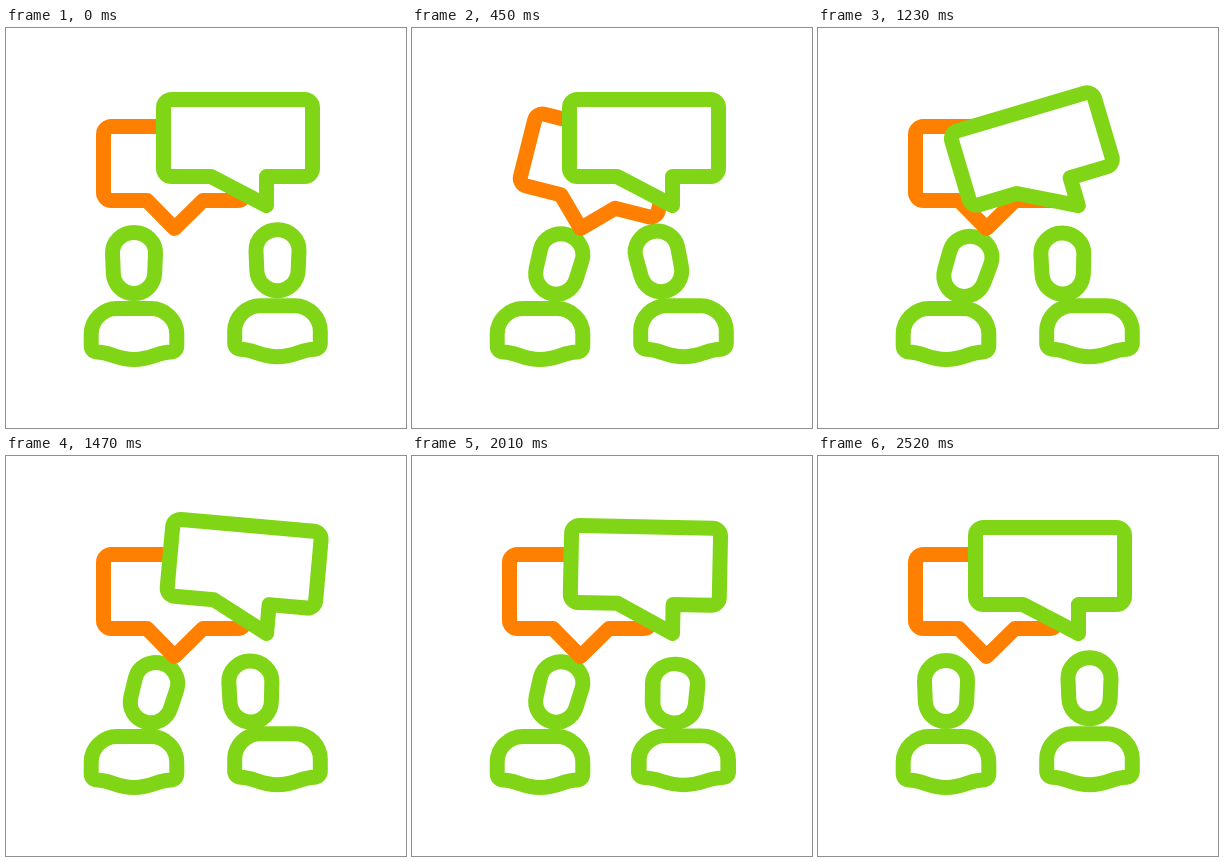
These frames come from a looping animation (400x400 px, 3050 ms). An HTML page:

```html
<!DOCTYPE html>
<html lang="en">
<head>
<meta charset="utf-8">
<title>Conversation</title>
<style>
  html, body { margin: 0; width: 100%; height: 100%; overflow: hidden; background: #fff; }
  svg { display: block; width: 100%; height: 100%; }
  path { fill: #fff; stroke-width: 15; stroke-linejoin: round; }
  .green { stroke: #80d616; }
  .orange { stroke: #ff7f00; }
</style>
</head>
<body>
<svg viewBox="0 0 400 400">
  <defs>
    <path id="head" d="M0-30.5C12-30.5 21.9-21 21.5-9.5L20.7 10C20.2 22 11 30.5 0 30.5S-20.2 22-20.7 10L-21.5-9.5C-21.9-21-12-30.5 0-30.5Z"/>
    <path id="body" d="M-17-58.5H17C31-58.5 42.8-47 42.8-33V-21.5Q42.8-15.5 37-15C24-15 17-7.5 0-7.5S-24-15-37-15Q-42.8-15.5-42.8-21.5V-33C-42.8-47-31-58.5-17-58.5Z"/>
  </defs>
  <g id="left" class="green"><use href="#body"/><use class="head" href="#head"/></g>
  <g id="right" class="green"><use href="#body"/><use class="head" href="#head"/></g>
  <path id="back" class="orange"/>
  <path id="front" class="green"/>
</svg>
<script>
const LOOP = 3050, STEP = 30;
const LEAN_TIME = 400, RETURN_TIME = 305, SQUASH_TIME = 460;
const NOD_START = 780, NOD_TIME = 420, FRONT_DELAY = 1095;
const $ = id => document.getElementById(id);

// Turning points of a bubble's decaying swing: time, angle.
const swing = [[0, 0], [186, -20], [480, 15], [720, -7.8], [1000, 3.6], [1200, 0]];

// lean and nod move the head by x, y and tilt.
const people = [
  { el: $('left'), x: 128, y: 339, lean: [18.8, 1, 15], nod: [2.7, 2.4, 3],
    back: 2040, nodEnd: NOD_START + NOD_TIME },
  { el: $('right'), x: 271.5, y: 336.2, lean: [-24.6, 1.2, -13], nod: [-2.4, 2.2, 12],
    back: 1815, nodEnd: 1815 }
];

const clamp = u => Math.min(1, Math.max(0, u));
const ramp = (t, start, time) => (1 - Math.cos(Math.PI * clamp((t - start) / time))) / 2;
const hump = (t, start, time) => Math.sin(Math.PI * clamp((t - start) / time)) ** 2;

function swingAngle(t) {
  let angle = 0;
  for (let i = 1; i < swing.length; i++) {
    const [from, a] = swing[i - 1], [to, b] = swing[i];
    angle += (b - a) * ramp(t, from, to - from);
  }
  return angle;
}

// Rounded box whose bottom edge, drawn left to right, takes a detour along the tail.
function bubble(left, top, right, bottom, tail) {
  const r = 8, arc = (x, y) => `a${r} ${r} 0 0 0 ${x} ${y}`;
  return `M${left + r} ${bottom}${tail}H${right - r}${arc(r, -r)}V${top + r}${arc(-r, -r)}` +
    `H${left + r}${arc(-r, r)}V${bottom - r}${arc(r, r)}Z`;
}

const place = (el, value) => el.setAttribute('transform', value);

function drawPerson(p, t) {
  const lean = ramp(t, 0, LEAN_TIME) - ramp(t, p.back, RETURN_TIME);
  const nod = ramp(t, NOD_START, NOD_TIME) - ramp(t, p.nodEnd, NOD_TIME);
  const squash = hump(t, 0, LEAN_TIME) + hump(t, p.back - 20, SQUASH_TIME);
  const [x, y, tilt] = p.lean.map((v, i) => v * lean + p.nod[i] * nod);
  place(p.el, `translate(${p.x} ${p.y}) scale(${1 + 0.045 * squash} ${1 - 0.035 * squash})`);
  place(p.el.querySelector('.head'), `translate(${x} ${y - 104}) rotate(${tilt})`);
}

function draw(t) {
  place($('back'), `rotate(${swingAngle(t)} 168.5 201)`);
  place($('front'), `rotate(${swingAngle(t - FRONT_DELAY)} 260.5 178)`);
  people.forEach(p => drawPerson(p, t));
}

$('back').setAttribute('d', bubble(97.5, 98.5, 239.5, 172.5, 'H141L168.5 200.5L197 172.5'));
$('front').setAttribute('d', bubble(157.5, 71.5, 306.5, 148.5, 'H205L260.5 177.5V148.5'));

const start = performance.now();
function tick() {
  const t = (performance.now() - start) % LOOP;
  draw(Math.floor(t / STEP) * STEP);
  requestAnimationFrame(tick);
}
tick();
</script>
</body>
</html>
```
